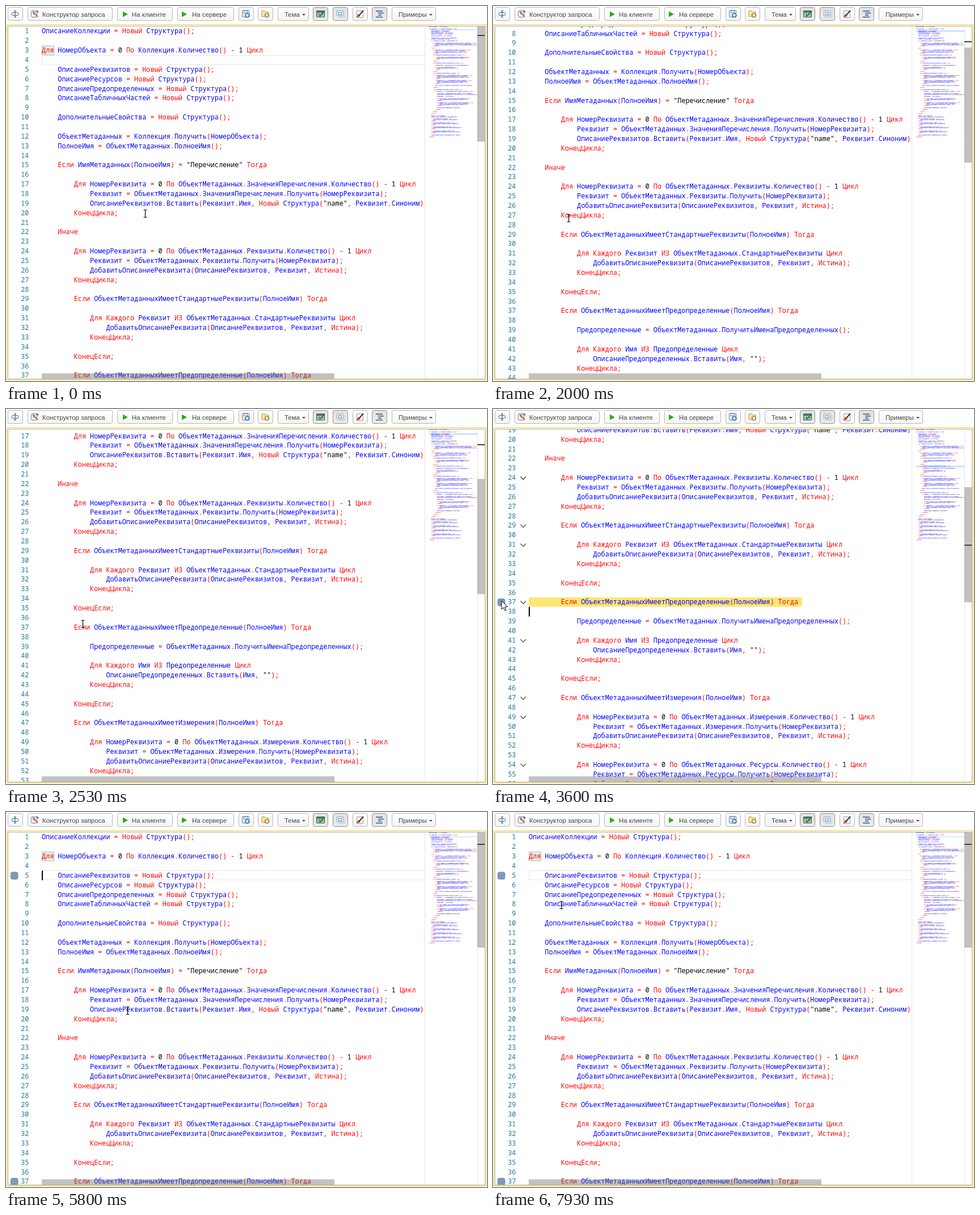
Recreate the animation shown at these times as an HTML page with a canvas. Size 848 by 661 pixels, loop 8 s.

```html
<!DOCTYPE html>
<html lang="ru">
<head>
<meta charset="utf-8">
<title>Закладки в редакторе</title>
<style>
html, body { margin: 0; width: 100%; height: 100%; overflow: hidden; background: #fff; }
canvas { display: block; }
</style>
</head>
<body>
<canvas id="stage" width="848" height="661"></canvas>
<script>
const SOURCE = `ОписаниеКоллекции = Новый Структура();

Для НомерОбъекта = 0 По Коллекция.Количество() - 1 Цикл

	ОписаниеРеквизитов = Новый Структура();
	ОписаниеРесурсов = Новый Структура();
	ОписаниеПредопределенных = Новый Структура();
	ОписаниеТабличныхЧастей = Новый Структура();

	ДополнительныеСвойства = Новый Структура();

	ОбъектМетаданных = Коллекция.Получить(НомерОбъекта);
	ПолноеИмя = ОбъектМетаданных.ПолноеИмя();

	Если ИмяМетаданных(ПолноеИмя) = "Перечисление" Тогда

		Для НомерРеквизита = 0 По ОбъектМетаданных.ЗначенияПеречисления.Количество() - 1 Цикл
			Реквизит = ОбъектМетаданных.ЗначенияПеречисления.Получить(НомерРеквизита);
			ОписаниеРеквизитов.Вставить(Реквизит.Имя, Новый Структура("name", Реквизит.Синоним));
		КонецЦикла;

	Иначе

		Для НомерРеквизита = 0 По ОбъектМетаданных.Реквизиты.Количество() - 1 Цикл
			Реквизит = ОбъектМетаданных.Реквизиты.Получить(НомерРеквизита);
			ДобавитьОписаниеРеквизита(ОписаниеРеквизитов, Реквизит, Истина);
		КонецЦикла;

		Если ОбъектМетаданныхИмеетСтандартныеРеквизиты(ПолноеИмя) Тогда

			Для Каждого Реквизит ИЗ ОбъектМетаданных.СтандартныеРеквизиты Цикл
				ДобавитьОписаниеРеквизита(ОписаниеРеквизитов, Реквизит, Истина);
			КонецЦикла;

		КонецЕсли;

		Если ОбъектМетаданныхИмеетПредопределенные(ПолноеИмя) Тогда

			Предопределенные = ОбъектМетаданных.ПолучитьИменаПредопределенных();

			Для Каждого Имя ИЗ Предопределенные Цикл
				ОписаниеПредопределенных.Вставить(Имя, "");
			КонецЦикла;

		КонецЕсли;

		Если ОбъектМетаданныхИмеетИзмерения(ПолноеИмя) Тогда

			Для НомерРеквизита = 0 По ОбъектМетаданных.Измерения.Количество() - 1 Цикл
				Реквизит = ОбъектМетаданных.Измерения.Получить(НомерРеквизита);
				ДобавитьОписаниеРеквизита(ОписаниеРеквизитов, Реквизит, Истина);
			КонецЦикла;

			Для НомерРеквизита = 0 По ОбъектМетаданных.Ресурсы.Количество() - 1 Цикл
				Реквизит = ОбъектМетаданных.Ресурсы.Получить(НомерРеквизита);
				ДобавитьОписаниеРеквизита(ОписаниеРесурсов, Реквизит, Истина);
			КонецЦикла;

			ЗаполнитьДополнительныеСвойства(ОбъектМетаданных, ДополнительныеСвойства);

		КонецЕсли;

		Если ОбъектМетаданныхИмеетТабличныеЧасти(ПолноеИмя) Тогда

			Для НомерЧасти = 0 По ОбъектМетаданных.ТабличныеЧасти.Количество() - 1 Цикл

				ТабличнаяЧасть = ОбъектМетаданных.ТабличныеЧасти.Получить(НомерЧасти);
				ОписаниеТабличныхЧастей.Вставить(ТабличнаяЧасть.Имя, Новый Структура("name", Синоним));

				ОписаниеЧасти = Новый Структура();

				Для Каждого Реквизит ИЗ ТабличнаяЧасть.СтандартныеРеквизиты Цикл
					ДобавитьОписаниеРеквизита(ОписаниеЧасти, Реквизит, Ложь);
				КонецЦикла;

				Для НомерРеквизита = 0 По ТабличнаяЧасть.Реквизиты.Количество() - 1 Цикл
					Реквизит = ТабличнаяЧасть.Реквизиты.Получить(НомерРеквизита);
					ДобавитьОписаниеРеквизита(ОписаниеЧасти, Реквизит, Ложь);
				КонецЦикла;

				Свойства.Вставить("properties", ОписаниеЧасти);

			КонецЦикла;

		КонецЕсли;

	КонецЕсли;

	Описание = Новый Структура();
	Описание.Вставить("properties", ОписаниеРеквизитов);

	Если ОписаниеРесурсов.Количество() Тогда
		Описание.Вставить("resources", ОписаниеРесурсов);
	КонецЕсли;

	Если ДополнительныеСвойства.Количество() Тогда
		Описание.Вставить("extra", ДополнительныеСвойства);
	КонецЕсли;

	Если ОписаниеПредопределенных.Количество() Тогда
		Описание.Вставить("predefined", ОписаниеПредопределенных);
	КонецЕсли;

	Если ОписаниеТабличныхЧастей.Количество() Тогда
		Описание.Вставить("tabulars", ОписаниеТабличныхЧастей);
	КонецЕсли;

	ОписаниеКоллекции.Вставить(ОбъектМетаданных.Имя, Описание);

КонецЦикла;`;

const LOOP = 8000, TOP = 36, BOTTOM = 657, LEFT = 63, RIGHT = 738;
const ROW = 16.86, CHAR = 7.09, MINI_ROW = 1.78, MINI_CHAR = 0.89, RULER_ROW = 5.53;
const RED = '#ff0000', BLUE = '#0000ff', BLACK = '#000';
const MONO = '11.82px "Noto Sans Mono", monospace';
const SANS = '11.4px "Liberation Sans", Arial, sans-serif';
const KEYWORDS = new Set('Для По Цикл Новый Если Тогда Иначе Каждого ИЗ КонецЦикла КонецЕсли Истина Ложь'.split(' '));

const stage = document.getElementById('stage');
const g = stage.getContext('2d');

function tokenColor(s) {
  if (/^["\d]/.test(s)) return BLACK;
  return /^[\wА-яё]/.test(s) && !KEYWORDS.has(s) ? BLUE : RED;
}

const lines = SOURCE.split('\n').map(raw => {
  const text = raw.replace(/\t/g, '    ');
  const tokens = [...text.matchAll(/"[^"]*"|[\wА-яё]+|[^\s\wА-яё"]+/g)]
    .map(m => ({ s: m[0], col: m.index, color: tokenColor(m[0]) }));
  return { text, tokens, fold: /^\s*(Если|Для)/.test(text) };
});

// Caret events: time, caret line, selected line (0 for none)
const EVENTS = [[-500, 4, 0], [1000, 6, 5], [3400, 38, 37], [4800, 37, 0], [5330, 5, 0], [6200, 37, 0], [7000, 5, 0]];
const MARKS = [[5, 1130], [37, 3600]];
// Wheel notches: start time, distance
const WHEEL = [[1700, 66.5], [1950, 66.5], [2250, 89], [2500, 89]];
const MOUSE = [[0, 245, 366], [70, 245, 366], [870, 13, 118], [1000, 11, 111], [1250, 11, 111], [2070, 135, 379],
  [2650, 135, 379], [3330, 15, 338], [3600, 15, 338], [4780, 214, 350], [7440, 214, 350], [7930, 120, 164]];

const clamp = v => Math.max(0, Math.min(1, v));

function mouseAt(t) {
  const i = MOUSE.findIndex(k => k[0] > t);
  if (i < 0) return MOUSE[MOUSE.length - 1].slice(1);
  const [t0, x0, y0] = MOUSE[i - 1], [t1, x1, y1] = MOUSE[i];
  let p = (t - t0) / (t1 - t0);
  p = p * p * (3 - 2 * p);
  return [x0 + (x1 - x0) * p, y0 + (y1 - y0) * p];
}

function scrollAt(t, line) {
  if (t >= 4800) return line === 37 ? 305 : 0;
  return WHEEL.reduce((sum, [start, dist]) => sum + dist * (1 - (1 - clamp((t - start) / 150)) ** 3), 0);
}

function box(x, y, w, h, fill, stroke, r = 0, lw = 1) {
  g.beginPath();
  g.roundRect(x, y, w, h, r);
  if (fill) { g.fillStyle = fill; g.fill(); }
  if (stroke) { g.strokeStyle = stroke; g.lineWidth = lw; g.stroke(); }
}

function poly(points, fill, stroke, lw = 1) {
  g.beginPath();
  points.forEach(([x, y]) => g.lineTo(x, y));
  if (fill) { g.closePath(); g.fillStyle = fill; g.fill(); }
  if (stroke) { g.strokeStyle = stroke; g.lineWidth = lw; g.stroke(); }
}

function label(s, x, y, color, font, align = 'left') {
  g.font = font;
  g.fillStyle = color;
  g.textAlign = align;
  g.fillText(s, x, y);
}

function button(x, w, pressed) {
  const fill = g.createLinearGradient(0, 3, 0, 26);
  fill.addColorStop(0, pressed ? '#e2e2e2' : '#ffffff');
  fill.addColorStop(1, pressed ? '#ececec' : '#f4f4f4');
  box(x + 0.5, 2.5, w, 23, fill, pressed ? '#8e8e8e' : '#b4b4b4', 3);
}

function gear(x, y, color) {
  g.beginPath(); g.arc(x, y, 3, 0, 7);
  g.fillStyle = '#fff'; g.fill();
  g.strokeStyle = color; g.lineWidth = 1.2; g.stroke();
  g.setLineDash([1.3, 1.2]);
  g.beginPath(); g.arc(x, y, 3.8, 0, 7); g.stroke();
  g.setLineDash([]);
}

const play = x => poly([[x, 9.5], [x + 9, 14.5], [x, 19.5]], '#2fa81c');
const drop = x => poly([[x - 3, 14], [x + 3, 14], [x, 17]], '#444');

function toolbar() {
  const steel = '#2f6591';
  button(3, 26); button(38, 149); button(196, 97); button(302, 99);
  button(410, 26); button(444, 26); button(479, 54);
  button(541, 26, true); button(576, 26, true); button(611, 26); button(645, 26, true); button(680, 77);

  box(10.5, 11.5, 11, 5, '#fff', steel, 1);
  poly([[14, 8.5], [18, 8.5], [16, 8.5], [16, 19.5], [14, 19.5], [18, 19.5]], null, steel, 1.2);

  box(44.5, 8.5, 10, 11, '#fff', '#537f9e', 1);
  poly([[47, 11], [53, 11]], null, '#537f9e');
  poly([[47, 14], [51, 14]], null, '#537f9e');
  poly([[47, 10], [56, 19]], null, '#de4b24', 2);
  poly([[54, 8], [57, 11]], null, steel, 2);
  label('Конструктор запроса', 64, 18.5, '#444', SANS);

  play(206); label('На клиенте', 222, 18.5, '#444', SANS);
  play(310); label('На сервере', 328, 18.5, '#444', SANS);

  box(416.5, 7.5, 12, 12, '#dcebf5', '#5c86a8', 1);
  box(419.5, 8, 6, 4, '#fff', '#5c86a8');
  gear(425.5, 16.5, steel);

  poly([[451, 18.5], [451, 8.5], [456, 8.5], [458, 10.5], [463, 10.5], [463, 18.5], [451, 18.5]], '#f8e3a0', '#c29d3c');
  gear(460, 16.5, '#9a7b26');

  label('Тема', 491, 18.5, '#444', SANS); drop(525);

  box(547.5, 8.5, 14, 11, '#a9cbb3', '#3d5c50');
  box(548, 9, 13, 3, '#4f7d60');
  poly([[548, 15.5], [561, 15.5]], null, '#5f8b72');
  poly([[552.5, 12], [552.5, 19]], null, '#5f8b72');
  poly([[553, 18], [562, 9]], null, '#267a3d', 2);

  box(583.5, 8.5, 11, 9, '#e8f0f6', '#8fabc0');
  box(586.5, 11.5, 5, 4, '#fff', '#5c86a8');
  poly([[585, 20], [597, 20], [597, 11]], null, '#b5c6d2');

  box(618.5, 8.5, 11, 12, '#fff', '#999');
  poly([[622, 17], [630, 8]], null, '#333', 2);
  poly([[618, 20], [621, 14], [625, 18]], '#d92b20');

  [[652, 664, 9], [656, 666, 12.5], [656, 662, 16], [652, 664, 19.5]].forEach(([a, b, y]) =>
    poly([[a, y], [b, y]], null, '#2a557b', 1.5));

  label('Примеры', 692, 18.5, '#444', SANS); drop(749);
}

// Static layer holding the tiny overview text
function makeMinimap() {
  const c = document.createElement('canvas'), k = 4;
  c.width = 88 * k; c.height = 205 * k;
  const m = c.getContext('2d');
  m.scale(k, k);
  lines.forEach((line, row) => line.tokens.forEach(({ s, col, color }) => {
    m.fillStyle = color;
    [...s].forEach((ch, i) => {
      m.globalAlpha = /[.,;=()-]/.test(ch) ? 0.22 : 0.36 + ch.charCodeAt(0) * 7 % 5 * 0.08;
      m.fillRect((col + i) * MINI_CHAR, row * MINI_ROW + 0.3, MINI_CHAR, 1);
    });
  }));
  return c;
}
const minimap = makeMinimap();

function bracket(line, col, len, y) {
  box(LEFT + col * CHAR + 0.5, y(line) + 0.5, len * CHAR, ROW - 1, 'rgba(0,100,0,.1)', '#b9b9b9');
}

function editor(t, state, scroll, mouse) {
  const [since, caret, selected] = state;
  const y = n => TOP + (n - 1) * ROW - scroll;
  const jumped = t >= 4800 && caret === 37 && t - since < 70;

  g.save();
  g.beginPath(); g.rect(4, TOP, RIGHT - 4, BOTTOM - TOP); g.clip();

  if (selected) {
    box(LEFT, y(selected), (lines[selected - 1].text.length + 1) * CHAR, ROW, '#ffe675', null, 3);
  } else {
    box(LEFT + 0.5, Math.round(y(caret)) + 0.5, RIGHT - LEFT, 16, null, '#e6e6e6');
  }
  bracket(3, 0, 3, y);
  if (jumped) { bracket(37, 8, 4, y); bracket(45, 8, 9, y); }

  const first = Math.floor(scroll / ROW);
  for (let i = first; i < Math.min(lines.length, first + 39); i++) {
    const base = y(i + 1) + 12.4;
    label(String(i + 1), 40.3, base, '#237893', MONO, 'right');
    lines[i].tokens.forEach(({ s, col, color }) => label(s, LEFT + col * CHAR, base, color, MONO));
    if (lines[i].fold && mouse[0] < LEFT) {
      const mid = base - 3.4;
      poly([[48.5, mid - 2.5], [53.3, mid + 2.5], [58.1, mid - 2.5]], null, '#424242', 1.2);
    }
  }
  MARKS.forEach(([line, from]) => {
    if (t >= from) box(8.5, y(line) + 2.5, 12.5, 12.5, '#7d9ab6', '#6f8ca8', 3);
  });
  if ((t - since) % 1000 < 475) box(LEFT, y(caret), 2, ROW, BLACK);
  g.restore();

  box(LEFT, 647.5, 516, 9.5, 'rgba(100,100,100,.4)');
  overview(caret, selected, scroll, jumped);
}

function overview(caret, selected, scroll, jumped) {
  const row = selected || caret;
  box(RIGHT, TOP, 1, BOTTOM - TOP, '#e4e4e4');
  g.save();
  g.beginPath(); g.rect(RIGHT + 1, TOP, 92, BOTTOM - TOP); g.clip();
  box(746, TOP + (row - 1) * MINI_ROW - 0.3, 85, selected ? 3 : 2, selected ? '#c9e3f8' : '#d6ebf9');
  g.drawImage(minimap, 746, TOP, 88, 205);
  g.restore();

  box(831, TOP, 1, BOTTOM - TOP, '#e4e4e4');
  const ruler = n => TOP + (n - 1) * RULER_ROW;
  if (jumped) [37, 45].forEach(n => box(832, ruler(n) - 1, 5, 5, '#a0a0a0'));
  box(831, TOP + scroll * 0.327, 13, 203, 'rgba(100,100,100,.4)');
  box(831, Math.round(ruler(caret) - 1.8), 13, 2, '#424242');
}

function pointer([x, y]) {
  if (x < LEFT) {
    const arrow = [[0, 0], [0, 15], [3.5, 12], [6, 17.5], [8.2, 16.5], [5.8, 11], [10.5, 10.5], [0, 0]];
    poly(arrow.map(([a, b]) => [x + a, y + b]), '#fff', BLACK, 1);
  } else {
    x = Math.round(x) + 0.5; y = Math.round(y);
    poly([[x - 3, y - 6.5], [x + 3, y - 6.5]], null, BLACK);
    poly([[x, y - 6], [x, y + 6]], null, BLACK, 1.2);
    poly([[x - 3, y + 6.5], [x + 3, y + 6.5]], null, BLACK);
  }
}

function draw() {
  const t = performance.now() % LOOP;
  const state = EVENTS.filter(e => e[0] <= t).pop();
  const mouse = mouseAt(t);
  box(0, 0, 848, 661, '#fff');
  toolbar();
  box(1.5, 33, 845, 626, null, '#f3da62', 1, 1.5);
  box(3.5, 35.5, 841, 622, '#fff', '#adadad');
  editor(t, state, scrollAt(t, state[1]), mouse);
  pointer(mouse);
  requestAnimationFrame(draw);
}
draw();
</script>
</body>
</html>
```
